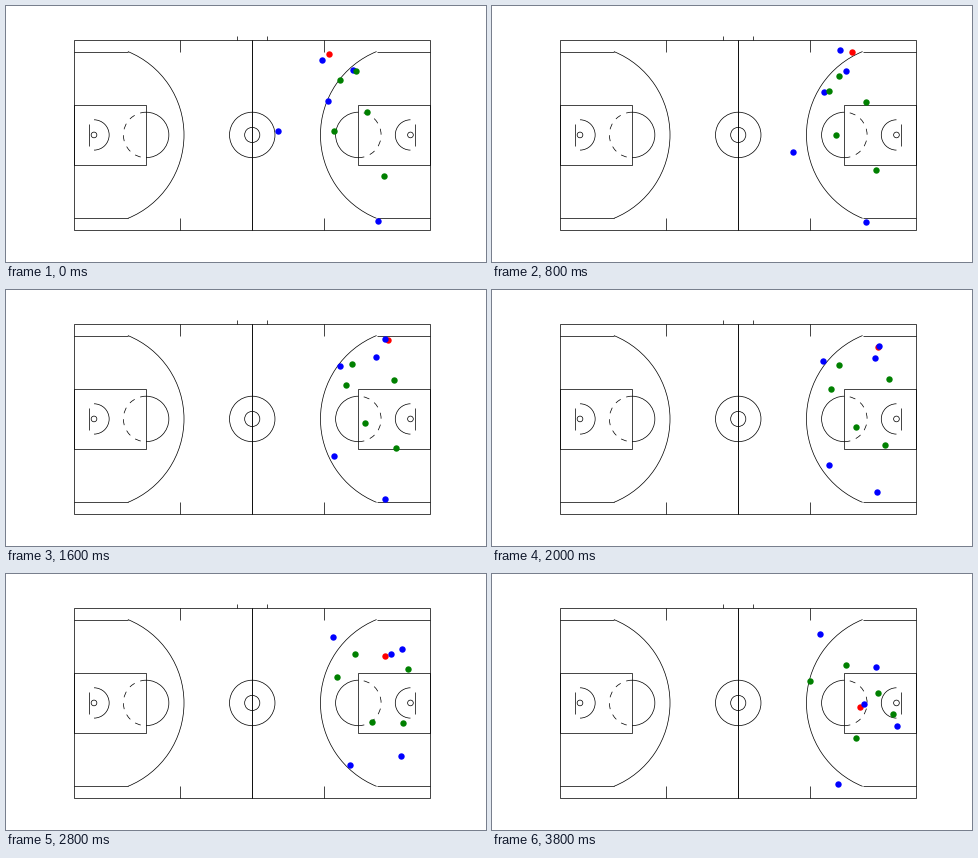
Recreate the animation shown at these times as a matplotlib script. Size 480x256 px, loop 4 s.

```python
import numpy as np
import matplotlib.pyplot as plt
from matplotlib.animation import FuncAnimation
from matplotlib.patches import Arc, Circle, Rectangle

W, H, DPI = 480, 256, 72
FRAMES, STEP = 20, 200
FT = 3.79                # pixels per foot
LEFT, BOTTOM = 68.1, 32.3
LINE = dict(lw=0.72, color="black")
DASH = 6 / LINE["lw"]

# Key positions in stage pixels, evenly spread over the loop
BALL = [[(323, 48), (366, 46), (386, 55), (379, 84), (368, 133)]]
BLUE = [
    [(316, 54), (354, 44), (386, 54), (385, 82), (372, 130)],
    [(347, 64), (361, 66), (395, 72), (384, 93)],
    [(322, 95), (335, 80), (327, 65), (328, 60)],
    [(272, 125), (335, 173), (346, 210)],
    [(372, 215), (376, 214), (392, 189), (405, 152)],
]
GREEN = [
    [(334, 74), (339, 98), (318, 107)],
    [(350, 65), (346, 73), (348, 78), (354, 91)],
    [(361, 106), (382, 92), (403, 91), (386, 119)],
    [(328, 125), (363, 136), (364, 164)],
    [(378, 170), (392, 156), (401, 140)],
]


def glide(points):
    """Smooth run through the key positions, one whole pixel per step."""
    p = np.array(points, float)
    m = np.gradient(p, axis=0)
    s = np.linspace(0, len(p) - 1, FRAMES)
    k = np.minimum(s.astype(int), len(p) - 2)
    u = (s - k)[:, None]
    ease = u * u * (3 - 2 * u)
    bend = u * (1 - u) * ((1 - u) * m[k] - u * m[k + 1])
    return np.round(p[k] + ease * (p[k + 1] - p[k]) + bend)


def to_court(xy):
    return (xy[:, 0] - LEFT) / FT, (H - xy[:, 1] - BOTTOM) / FT


fig = plt.figure(figsize=(W / DPI, H / DPI), dpi=DPI, facecolor="white")
ax = fig.add_axes([0, 0, 1, 1])
ax.set_xlim(-LEFT / FT, (W - LEFT) / FT)
ax.set_ylim(-BOTTOM / FT, (H - BOTTOM) / FT)
ax.axis("off")


def seg(x0, y0, x1, y1):
    ax.plot([x0, x1], [y0, y1], solid_capstyle="butt", **LINE)


def box(x0, x1, y, h):
    ax.add_patch(Rectangle((min(x0, x1), y), abs(x1 - x0), h, fill=False, **LINE))


def ring(x, r):
    ax.add_patch(Circle((x, 25), r, fill=False, **LINE))


def arc(x, r, mid, half, **kw):
    ax.add_patch(Arc((x, 25), 2 * r, 2 * r, theta1=mid - half,
                     theta2=mid + half, **LINE, **kw))


def half_court(flip):
    fx = (lambda x: 94 - x) if flip else (lambda x: x)
    front = 180 if flip else 0
    hoop, reach = fx(5.25), 23.75
    box(fx(0), fx(47), 0, 50)
    box(fx(0), fx(19), 17, 16)
    arc(fx(19), 6, front, 90)
    arc(fx(19), 6, front + 180, 90, ls=(0, (DASH, DASH)))
    arc(hoop, 4, front, 90)
    ring(hoop, 0.75)
    seg(fx(4), 22, fx(4), 28)
    arc(hoop, reach, front, np.degrees(np.arcsin(22 / reach)))
    corner = fx(5.25 + np.sqrt(reach**2 - 22**2))
    for y in (3, 47):
        seg(fx(0), y, corner, y)
    seg(fx(28), 0, fx(28), 3)
    seg(fx(28), 47, fx(28), 50)
    seg(fx(43), 50, fx(43), 51)


half_court(False)
half_court(True)
ring(47, 6)
ring(47, 2)

teams = []
for color, tracks in (("red", BALL), ("blue", BLUE), ("green", GREEN)):
    dots, = ax.plot([], [], "o", color=color, ms=6.4, mew=0, zorder=5)
    teams.append((dots, np.array([glide(p) for p in tracks])))


def update(i):
    for dots, paths in teams:
        dots.set_data(*to_court(paths[:, i]))
    return [dots for dots, _ in teams]


anim = FuncAnimation(fig, update, frames=FRAMES, interval=STEP,
                     init_func=lambda: update(0), repeat=True, repeat_delay=0)
plt.show()
```
